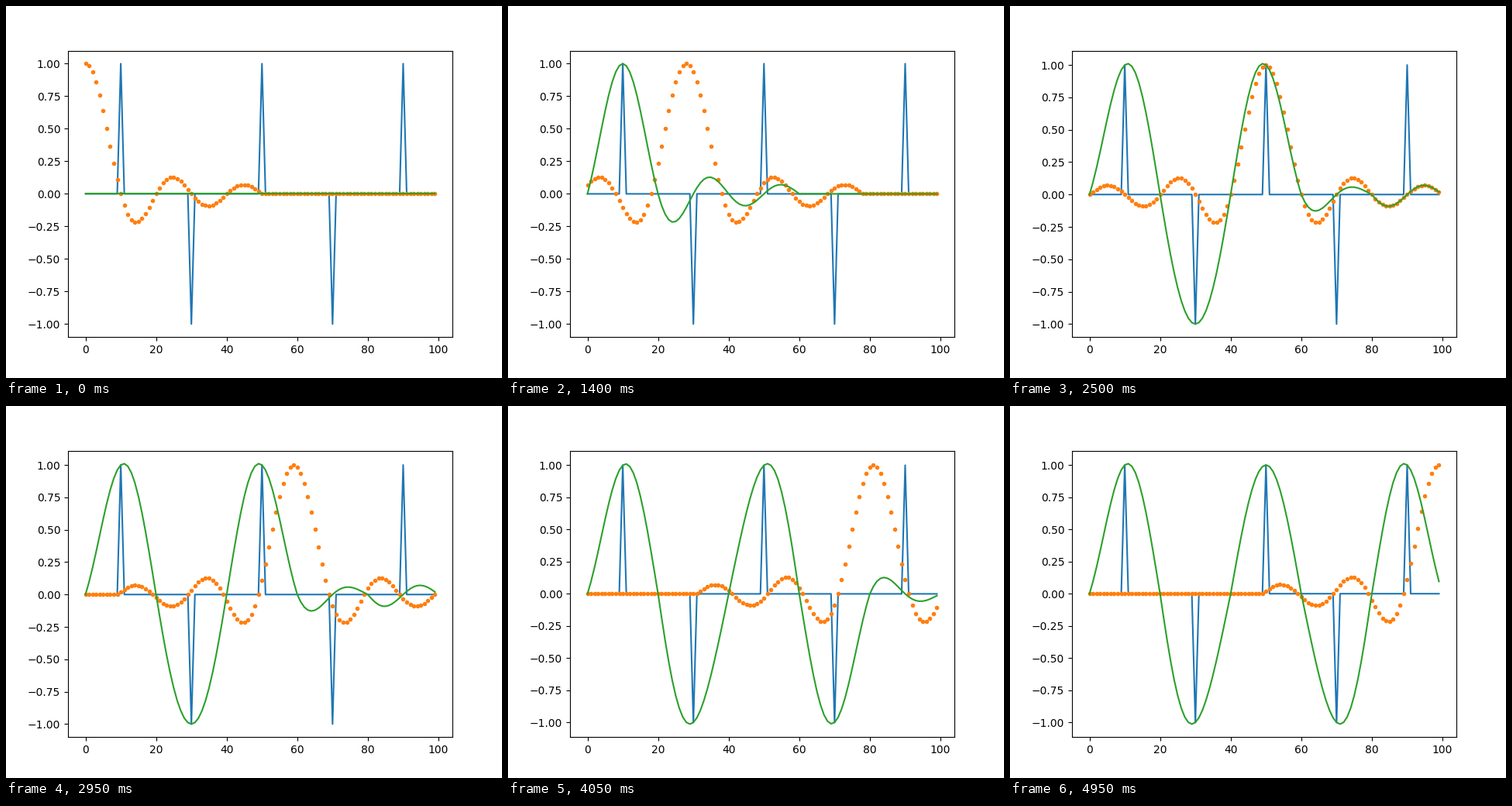
Animation, 640 px wide and 480 px high, one loop 5 s. Source, as a matplotlib script:

```python
import matplotlib.pyplot as plt
import numpy as np
from matplotlib.animation import FuncAnimation

COUNT = 100      # samples, and one frame per sample
SPACING = 10     # distance between zero crossings of the kernel
REACH = 50       # kernel covers [-REACH, REACH)

x = np.arange(COUNT)
pulses = np.zeros(COUNT)
pulses[10::40] = 1
pulses[30::40] = -1


def kernel(center):
    """Truncated sinc centred on one sample."""
    d = x - center
    return np.where((d >= -REACH) & (d < REACH), np.sinc(d / SPACING), 0.0)


def reconstruction(last):
    """Sum of the kernels of every pulse passed so far."""
    total = np.zeros(COUNT)
    for k in np.flatnonzero(pulses[:last + 1]):
        total += pulses[k] * kernel(k)
    return total


fig, ax = plt.subplots(figsize=(6.4, 4.8), dpi=100)


def draw(n):
    ax.clear()
    ax.plot(x, pulses, color="C0")
    ax.plot(x, kernel(n), ".", color="C1")
    ax.plot(x, reconstruction(n), color="C2")


anim = FuncAnimation(fig, draw, frames=COUNT, interval=50, repeat=True)
plt.show()
```
